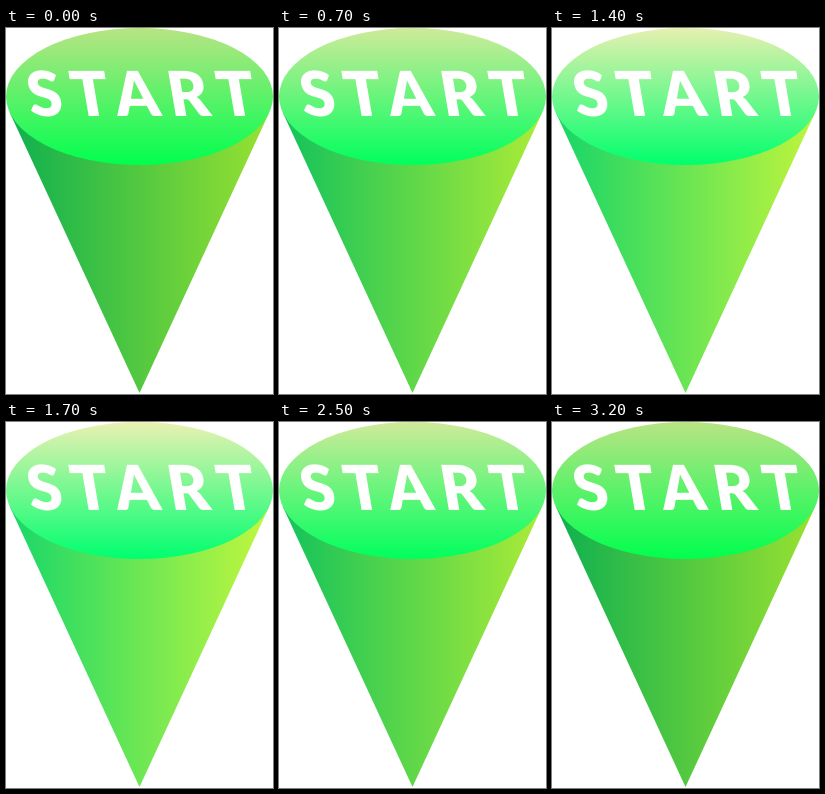
An HTML page with a canvas for the animation above (3.3 s loop, 267 px wide and 366 px high).

```html
<!DOCTYPE html>
<html lang="en">
<head>
<meta charset="utf-8">
<title>Start</title>
<style>
html, body { margin: 0; width: 100%; height: 100%; overflow: hidden; background: #fff; }
canvas { display: block; }
</style>
</head>
<body>
<canvas id="stage" width="267" height="366"></canvas>
<script>
const ctx = document.getElementById('stage').getContext('2d');
const LOOP = 3300, STEP = 100, PEAK = 16;
const CX = 133.5, CY = 68.5, RX = 133.5, RY = 68.5, TIP = 365;
const BACKSLANT = 0.17;

// Points where lines from the tip touch the ellipse
const sinT = RY / (TIP - CY);
const edgeX = RX * Math.sqrt(1 - sinT * sinT);
const edgeY = CY + RY * sinT;

// Each colour runs from its dim to its bright value
const COLORS = {
  left: [[12, 175, 80], [20, 218, 108]],
  right: [[154, 226, 48], [200, 248, 62]],
  back: [[184, 228, 132], [236, 242, 182]],
  front: [[0, 255, 78], [0, 255, 112]]
};

function shade(name, k) {
  const [dim, bright] = COLORS[name];
  return `rgb(${dim.map((v, i) => Math.round(v + (bright[i] - v) * k)).join(',')})`;
}

function gradient(x0, y0, x1, y1, from, to, k) {
  const g = ctx.createLinearGradient(x0, y0, x1, y1);
  g.addColorStop(0, shade(from, k));
  g.addColorStop(1, shade(to, k));
  return g;
}

function label(text, x, y) {
  ctx.save();
  ctx.transform(1, 0, BACKSLANT, 1, x, y);
  ctx.fillStyle = '#fff';
  ctx.font = '900 62px Lato, sans-serif';
  ctx.letterSpacing = '9.6px';
  ctx.fillText(text, 0, 0);
  ctx.restore();
}

function draw(time) {
  const step = Math.floor((time % LOOP) / STEP);
  const k = 1 - Math.abs(step - PEAK) / PEAK;

  ctx.fillStyle = '#fff';
  ctx.fillRect(0, 0, 267, 366);

  ctx.fillStyle = gradient(0, 0, 267, 0, 'left', 'right', k);
  ctx.beginPath();
  ctx.moveTo(CX - edgeX, edgeY);
  ctx.lineTo(CX + edgeX, edgeY);
  ctx.lineTo(CX, TIP);
  ctx.fill();

  ctx.fillStyle = gradient(0, 0, 0, 2 * RY, 'back', 'front', k);
  ctx.beginPath();
  ctx.ellipse(CX, CY, RX, RY, 0, 0, 2 * Math.PI);
  ctx.fill();

  label('START', 25, 87.5);
}

function tick(now) {
  draw(now);
  requestAnimationFrame(tick);
}

draw(0);
requestAnimationFrame(tick);
</script>
</body>
</html>
```
